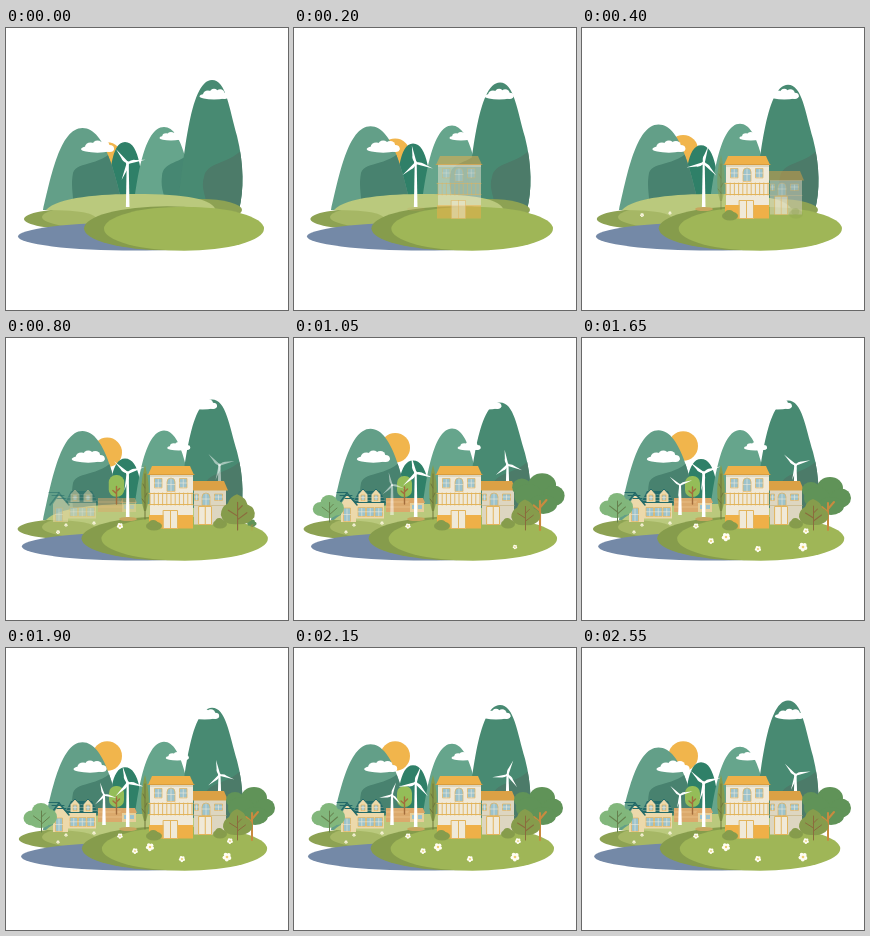
These frames come from a looping animation (282 px wide and 282 px high, 2.6 s). An HTML page with a canvas:

```html
<!DOCTYPE html>
<html>
<head>
<meta charset="utf-8">
<style>
html, body { margin: 0; width: 100%; height: 100%; overflow: hidden; background: #fff; }
canvas { display: block; width: 282px; height: 282px; }
</style>
</head>
<body>
<canvas id="stage"></canvas>
<script>
const LOOP = 2600, STEP = 50, SIZE = 282;
const canvas = document.getElementById('stage');
const density = Math.max(1, window.devicePixelRatio || 1);
canvas.width = canvas.height = SIZE * density;
const g = canvas.getContext('2d');
const GOLD = '#efb048', CREAM = '#f0e9d8', TRIM = '#e2b45c', GLASS = '#9cc3cd',
  TEAL = '#236a68', OLIVE = '#869c4c', BROWN = '#8c6b3e';

const clamp = v => Math.max(0, Math.min(1, v));
const fadeAt = (t, start, length) => clamp((t - start) / length);

function fill(color, path) {
  g.fillStyle = color;
  g.fill(new Path2D(path));
}
function line(color, width, path) {
  g.strokeStyle = color;
  g.lineWidth = width;
  g.stroke(new Path2D(path));
}
function oval(color, x, y, rx, ry = rx) {
  g.fillStyle = color;
  g.beginPath();
  g.ellipse(x, y, rx, ry, 0, 0, Math.PI * 2);
  g.fill();
}
function box(color, x, y, w, h) {
  g.fillStyle = color;
  g.fillRect(x, y, w, h);
}
function faded(alpha, draw) {
  if (alpha <= 0) return;
  g.save();
  g.globalAlpha = alpha;
  draw();
  g.restore();
}
// Springs up from the base point with a damped wobble.
function grow(t, start, x, y, draw) {
  const u = (t - start) / 1000;
  if (u <= 0) return;
  const wobble = Math.exp(-9 * u) * Math.cos(14 * u);
  g.save();
  g.translate(x, y);
  g.scale(1 - wobble, 1 - wobble);
  g.translate(-x, -y);
  draw();
  g.restore();
}

// The outline stretches to its peak while the shadow stays put inside it.
function mountain(peak, restPeak, color, shade, body, shadow) {
  const base = 182, stretch = (base - peak) / (base - restPeak);
  const outline = new Path2D();
  outline.addPath(new Path2D(body), new DOMMatrix([1, 0, 0, stretch, 0, base * (1 - stretch)]));
  g.save();
  g.fillStyle = color;
  g.fill(outline);
  g.clip(outline);
  if (shadow) fill(shade, shadow);
  g.restore();
}

function cloud(x, y, s) {
  g.save();
  g.translate(x, y);
  g.scale(s, s);
  oval('#fff', 0, 2, 16.5, 3.7);
  oval('#fff', -7, 0, 5.5, 4.5);
  oval('#fff', 0, -2, 5, 4.5);
  oval('#fff', 7, -1.5, 5, 4.5);
  oval('#fff', 12, 1.5, 4.5, 3.5);
  g.restore();
}

function turbine(x, y, base, size, degrees) {
  fill('#fff', `M${x - 1} ${y}h2l.8 ${base - y}h-3.6z`);
  for (let i = 0; i < 3; i++) {
    g.save();
    g.translate(x, y);
    g.rotate((degrees + i * 120) * Math.PI / 180);
    g.scale(size, size);
    fill('#fff', 'M-.7 0Q-3 -5 -1.5 -8L.3 -18L1 0z');
    g.restore();
  }
  oval('#fff', x, y, 1.7 * size);
}

function pane(x, y, w, h, arched) {
  const top = arched ? `v${-(h - w / 2)}a${w / 2} ${w / 2} 0 0 1 ${w} 0v${h - w / 2}` : `v${-h}h${w}v${h}`;
  const path = `M${x} ${y + h}${top}z`;
  fill(GLASS, path);
  line(TRIM, .7, path);
  line(CREAM, .6, `M${x + w / 2} ${y + 1}v${h - 1}M${x} ${y + h / 2}h${w}`);
}
function door(x, y, w, h) {
  box(CREAM, x, y, w, h);
  line(TRIM, 1, `M${x} ${y}h${w}v${h}h${-w}zm${w / 2} 0v${h}`);
}

function bigHouse() {
  box(CREAM, 144, 136, 43, 42);
  box('#ddd6bf', 144, 137, 43, 2);
  box(GOLD, 143, 177, 44, 13.5);
  fill(GOLD, 'M146 128h38l4 9h-46z');
  line('#d99c3d', 1, 'M142 136.5h46');
  pane(148.5, 140.5, 7.5, 9);
  pane(173.5, 140.5, 7.5, 9);
  pane(161, 140, 8, 13, true);
  line(TRIM, 1, 'M143 155.5h44M143 166.5h44');
  for (let x = 144; x < 188; x += 4.2) line(TRIM, .9, `M${x} 155v12`);
  door(157.5, 172.5, 14, 18);
}
function smallHouse() {
  box('#ddd6c1', 188, 152, 32, 34.5);
  fill('#dba145', 'M187 143h31l4 9.5h-35z');
  line('#c9b98c', .8, 'M188 167.5h32');
  pane(188.5, 156, 4, 6);
  pane(208.5, 156, 8, 6);
  pane(196, 155, 8, 12, true);
  door(193, 168.5, 12.5, 18);
}
function cottage() {
  box('#ecd9ab', 62, 163, 28, 17.5);
  fill(TEAL, 'M59 165l6-12h21l6 12z');
  line('#7fa294', .7, 'M64 156.5h23M62 159.5h27M61 162.5h30');
  fill('#ecd9ab', 'M47 184v-18l6-9l9 9v18z');
  line(TEAL, 1.5, 'M44 167l9-12l10 12');
  line(TEAL, 1, 'M43 154.5h10M46 157.5h12M51 160.5h9');
  for (const x of [69, 82]) {
    fill('#ecd9ab', `M${x - 4.5} 164v-8l4.5-5l4.5 5v8z`);
    line(TEAL, 1, `M${x - 5} 156.5l5-5.5l5 5.5`);
    pane(x - 2, 157, 4, 5);
  }
  pane(49.5, 170, 7, 13);
  for (const x of [64, 72.5, 81]) pane(x, 169.5, 7.5, 8.5);
}
function annex() {
  box('#dba96c', 92, 160, 25, 14);
  line('#e9c28b', .8, 'M92 164h25M92 169h25');
  box('#e6cf9a', 116, 164, 14, 10);
  fill('#dca766', 'M114 165l3-5h12l2 5z');
  box(GLASS, 118, 167, 4, 4);
  box(GLASS, 124, 167, 4, 4);
}

function poplar() {
  fill(OLIVE, 'M139 127Q146 153 140 173h-2Q132 153 139 127z');
  line('#6f763d', 1, 'M139 136v45M139 150l-2-4M139 159l2-4M139 165l-3-4');
}
function roundTree() {
  g.fillStyle = '#94bd58';
  g.beginPath();
  g.roundRect(103, 138, 15, 21, 7);
  g.fill();
  line('#a36d3c', 1.4, 'M110.5 149v17M110.5 156l-3.5-3M110.5 154l3-3');
}
function leftTree() {
  const leaf = '#82b77c';
  oval(leaf, 35, 163, 9, 8);
  oval(leaf, 26, 170, 8.5, 7.5);
  oval(leaf, 43, 169, 8, 8);
  oval(leaf, 34, 172, 11, 8);
  line('#66804e', 1, 'M35.5 163v21M35.5 174l-8-6M35.5 176l8-7M35.5 169l4-4');
}
function oliveTree() {
  fill(OLIVE, 'M231 161Q239 164 240 170Q248 173 246 181Q241 188 231 187Q219 188 217 179Q217 172 223 169Q225 163 231 161z');
  line(BROWN, 1, 'M231.5 168v24M231.5 180l-8-5M231.5 183l8-6M231.5 175l4-4');
}
function bigTree() {
  const leaf = '#609358';
  oval(leaf, 229, 152, 9, 8);
  oval(leaf, 248, 150, 13, 11);
  oval(leaf, 259, 160, 10, 9.5);
  oval(leaf, 235, 160, 13, 11);
  oval(leaf, 249, 168, 13, 9);
  line('#c98a3f', 2, 'M246 165v27M246 174l-6-5M246 171l6-7');
}
function flower(x, y, r) {
  for (let a = .4; a < 6.2; a += Math.PI * .4)
    oval('#fffdf2', x + Math.cos(a) * r, y + Math.sin(a) * r, r * .75);
  oval('#efcf72', x, y, r * .5);
}
function bush(x, y, w) {
  oval(OLIVE, x, y, w, 4.5);
  oval(OLIVE, x - w * .1, y - 2.5, w * .55, 3.5);
}

function draw(t) {
  const sway = t < 1250 ? t / 1250 : (LOOP - t) / 1350;
  const spin = 79 + 360 * t / LOOP;
  g.setTransform(density, 0, 0, density, 0, 0);
  g.clearRect(0, 0, SIZE, SIZE);
  g.lineCap = 'round';

  oval('#f1b54c', 101.2, 129 - 21 * clamp(t / 1150), 14.8);
  mountain(114 + 10 * sway, 114, '#2f8068', '#2a7560',
    'M102 182C103 148 105 114 119 114C134 114 136 148 139 182z');
  mountain(99 - 10 * sway, 99, '#66a58c', '#468772',
    'M127 182C131 151 138 99 158 99C177 99 183 146 191 182z',
    'M190 120C174 137 157 133 156 148C154 163 160 168 161 182H195z');
  mountain(100 - 11 * sway, 100, '#639f88', '#48826f',
    'M37 182C45 149 54 100 76.5 100C100 100 110 151 118 182z',
    'M113 115C98 140 71 132 67 145C64 162 69 168 66 182H120z');
  mountain(52 + 15 * sway, 52, '#488a72', '#4c7b69',
    'M171 182C178 135 183 52 206 52C220 52 223 80 231 108C238 136 238 163 233 182z',
    'M240 118C222 138 201 133 198 149C194 163 202 168 200 182H240z');
  cloud(91.5 - 14.5 * sway, 119, 1);
  cloud(165 + 12 * sway, 108.5, .7);
  cloud(208 - 18 * sway, 66.5, .88);
  faded(fadeAt(t, 700, 200), () => turbine(213.5, 127, 150, .86, spin + 4));

  // Ground and water
  const backLeft = 18 - 10 * sway, waterLeft = 12 + 6 * sway;
  const left = 78 - 4 * sway, right = 258 + 6 * sway;
  oval('#8da253', 195, 182, 41, 11);
  oval('#8da253', (backLeft + 130) / 2, 191, (130 - backLeft) / 2, 10.5);
  oval('#a6b765', 98, 189, 62, 12);
  fill('#bac97d', 'M40 182C52 169 95 166 130 166C180 166 208 171 210 183L200 194H90Q96 182 40 182z');
  oval('#7489a7', (waterLeft + 245) / 2, 208.5, (245 - waterLeft) / 2, 14);
  oval(OLIVE, (left + right - 14) / 2, 200.3, (right - left - 14) / 2, 22);
  oval('#9fb657', (left + 20 + right) / 2, 200.7, (right - left - 20) / 2, 22);
  faded(fadeAt(t, 150, 250), () => oval('#c8a65e', 122, 181, 9, 2));

  // Settlement
  faded(fadeAt(t, 700, 200), annex);
  grow(t, 500, 110.5, 166, roundTree);
  faded(fadeAt(t, 950, 200), () => turbine(98, 147, 177, .73, spin));
  turbine(121.7, 135, 179, 1, spin);
  faded(fadeAt(t, 700, 200), cottage);
  faded(fadeAt(t, 250, 300), poplar);
  faded(fadeAt(t, 300, 200), smallHouse);
  faded(fadeAt(t, 100, 200), bigHouse);
  faded(fadeAt(t, 200, 150), () => bush(148, 188, 8));
  faded(fadeAt(t, 350, 200), () => bush(214, 186, 7));
  grow(t, 950, 36, 184, leftTree);
  grow(t, 780, 246, 192, bigTree);
  grow(t, 600, 231, 192, oliveTree);

  const flowers = [
    [60, 187, 1, 250], [88, 185, 1, 300], [52, 194, 1, 600],
    [114, 188, 1.6, 650], [176, 211, 1.8, 1050], [224, 193, 1.7, 1100],
    [221, 209, 2.6, 1000], [129, 203, 1.7, 1350], [144, 199, 2.4, 1350]
  ];
  for (const [x, y, r, start] of flowers)
    grow(t, start, x, y, () => flower(x, y, r));
}

function frame(now) {
  draw(Math.floor((now % LOOP) / STEP) * STEP);
  requestAnimationFrame(frame);
}
draw(0);
requestAnimationFrame(frame);
</script>
</body>
</html>
```
